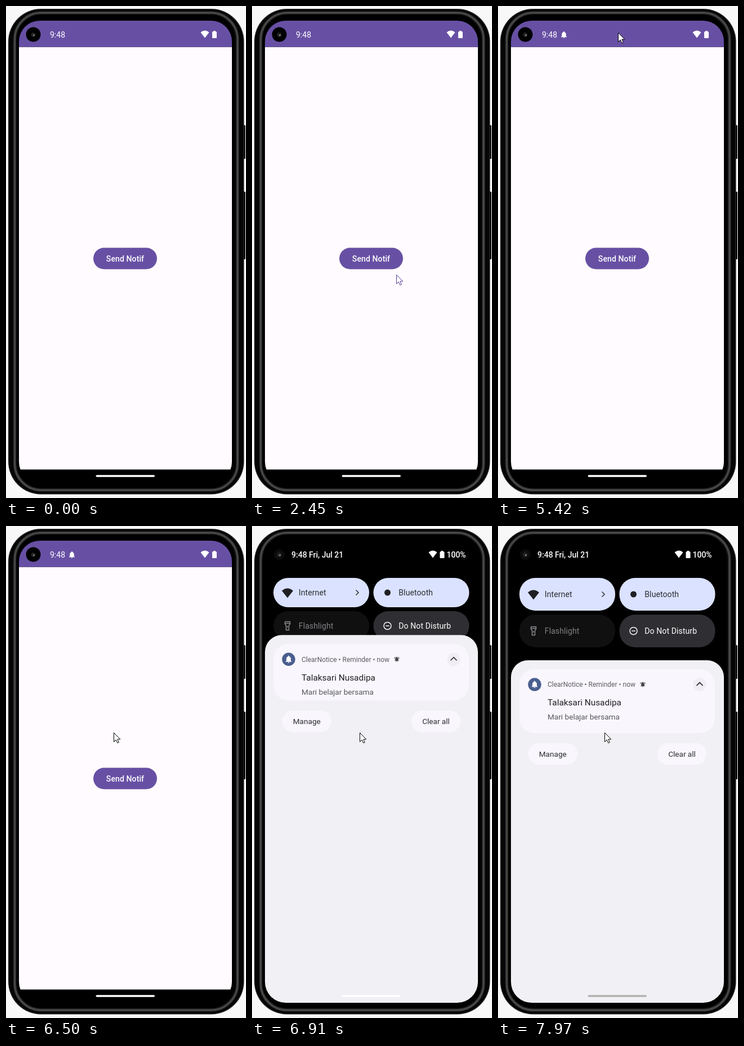
An HTML page with a canvas for the animation above (8 s loop, 426 by 872 pixels).

```html
<!DOCTYPE html>
<html lang="en">
<head>
<meta charset="utf-8">
<title>Notification demo</title>
<style>
html, body { margin: 0; width: 100%; height: 100%; overflow: hidden; background: #f8f8f8; }
canvas { display: block; width: 426px; height: 872px; }
</style>
</head>
<body>
<canvas id="stage"></canvas>
<script>
const W = 426, H = 872, LOOP = 8000;
const canvas = document.getElementById('stage');
const ctx = canvas.getContext('2d');
const dpr = window.devicePixelRatio || 1;
canvas.width = W * dpr;
canvas.height = H * dpr;

const PURPLE = '#6750a4', PAGE = '#fffbfe', PANEL = '#f1f0f4', CARD = '#f9f7fd',
      SKY = '#dae2ff', NAVY = '#4a5f8f', INK = '#1f1f23';

const bellBody = new Path2D('M18 16v-5c0-3.07-1.64-5.64-4.5-6.32V4c0-.83-.67-1.5-1.5-1.5s-1.5.67-1.5 1.5v.68C7.63 5.36 6 7.92 6 11v5l-2 2v1h16v-1z');
const bellClapper = new Path2D('M10 20h4a2 2 0 0 1-4 0z');
const bellWaves = new Path2D('M7.6 4.1L6.15 2.65A10.4 10.4 0 0 0 2 10.5h2a8.4 8.4 0 0 1 3.6-6.4zM20 10.5h2a10.4 10.4 0 0 0-4.15-7.85L16.4 4.1a8.4 8.4 0 0 1 3.6 6.4z');
const arrow = new Path2D('M.5 .5V16.5L4.2 13L6.8 18.6L9.3 17.5L6.8 12H11.8Z');

// Each move: start, end, number of steps, points on the way
const moves = [
  [380, 970, 10, [402, 816], [376, 578], [258, 478]],
  [1040, 1110, 2, [258, 478], [256, 476]],
  [2640, 3160, 8, [256, 476], [219, 460]],
  [5210, 5420, 4, [219, 460], [213, 47]],
  [5750, 5890, 3, [213, 47], [199, 50]],
  [6220, 6500, 5, [199, 50], [197, 35], [192, 100], [186, 190], [181, 320], [191, 366]],
  [7970, 7970, 1, [191, 366], [189, 366]]
];

const mix = (a, b, p) => a + (b - a) * p;

function stepped(t, from, to, n) {
  if (t < from) return 0;
  if (t >= to) return 1;
  return (Math.floor((t - from) / (to - from) * (n - 1)) + 1) / n;
}

function along(points, p) {
  const at = p * (points.length - 1);
  const i = Math.min(Math.floor(at), points.length - 2);
  const [a, b] = [points[i], points[i + 1]];
  return [mix(a[0], b[0], at - i), mix(a[1], b[1], at - i)];
}

function box(x, y, w, h, r, fill) {
  ctx.beginPath();
  ctx.roundRect(x, y, w, h, r);
  ctx.fillStyle = fill;
  ctx.fill();
}

function disc(x, y, r, fill) {
  ctx.beginPath();
  ctx.arc(x, y, r, 0, 7);
  ctx.fillStyle = fill;
  ctx.fill();
}

function line(color, width, ...points) {
  ctx.beginPath();
  points.forEach(([x, y]) => ctx.lineTo(x, y));
  ctx.strokeStyle = color;
  ctx.lineWidth = width;
  ctx.stroke();
}

function text(str, x, y, size, color, weight = 400, align = 'left', spacing = 0) {
  ctx.font = `${weight} ${size}px Roboto, sans-serif`;
  ctx.textAlign = align;
  ctx.letterSpacing = spacing + 'px';
  ctx.fillStyle = color;
  ctx.fillText(str, x, y);
  return ctx.measureText(str).width;
}

function faded(alpha, draw) {
  if (alpha <= 0) return;
  ctx.save();
  ctx.globalAlpha = alpha;
  draw();
  ctx.restore();
}

function bell(cx, cy, scale, color, waves = false, clapper = true) {
  ctx.save();
  ctx.translate(cx - 12 * scale, cy - 12.25 * scale);
  ctx.scale(scale, scale);
  ctx.fillStyle = color;
  ctx.fill(bellBody);
  if (clapper) ctx.fill(bellClapper);
  if (waves) ctx.fill(bellWaves);
  ctx.restore();
}

function wifi(cx, cy, r, color) {
  ctx.beginPath();
  ctx.moveTo(cx, cy + r * 0.86);
  ctx.lineTo(cx - r, cy - r * 0.42);
  ctx.quadraticCurveTo(cx, cy - r * 1.3, cx + r, cy - r * 0.42);
  ctx.closePath();
  ctx.fillStyle = color;
  ctx.fill();
}

function battery(x) {
  box(x, 45.5, 8, 11.5, 1, '#fff');
  box(x + 2, 44, 4, 3, 0.5, '#fff');
}

function phone() {
  ctx.fillStyle = '#f8f8f8';
  ctx.fillRect(0, 0, W, H);
  box(420, 211, 5, 60, 1.5, '#151515');
  box(420, 329, 5, 120, 1.5, '#0a0a0a');
  box(4, 5, 418.5, 860.5, 58, '#1d1d1d');
  box(5.5, 6.5, 415.5, 857.5, 57, '#050505');
  // Soft metal highlight, widest layer first
  for (const [width, color] of [[6, '#1a1b1a'], [4, '#363735'], [2, '#4b4c4a']]) {
    ctx.beginPath();
    ctx.roundRect(15.5, 12, 395.5, 846, 47);
    ctx.strokeStyle = color;
    ctx.lineWidth = width;
    ctx.stroke();
  }
}

function camera(inShade) {
  disc(48.5, 50.5, inShade ? 9.5 : 13, inShade ? '#0c0c0c' : '#000');
  disc(48.5, 51, 3.6, '#333');
  disc(48.5, 51, 2, '#0c0c0c');
  disc(49.3, 51.6, 1.2, '#b5b5b5');
}

function statusBar() {
  text('9:48', 78, 56.4, 14, '#fff');
  wifi(353, 50, 7.5, '#fff');
  battery(366);
}

function homePage(t) {
  ctx.fillStyle = PAGE;
  ctx.fillRect(23, 72.7, 378, 748.8);
  ctx.fillStyle = PURPLE;
  ctx.fillRect(23, 26, 378, 46.7);
  statusBar();
  const rise = stepped(t, 4140, 4340, 4);
  faded(rise, () => bell(117, 51, 0.62, '#fff', false, t >= 4530));

  box(155, 428.5, 113, 38, 19, PURPLE);
  if (t >= 4140 && t < 4340) {
    ctx.save();
    ctx.beginPath();
    ctx.roundRect(155, 428.5, 113, 38, 19);
    ctx.clip();
    disc(219, 460, 70 * rise, 'rgba(255,255,255,.14)');
    ctx.restore();
  }
  text('Send Notif', 211.5, 452.5, 14, '#fff', 500, 'center', 0.1);
}

function dialog() {
  box(47.5, 313, 328.5, 268.5, 27, PANEL);
  bell(211.5, 346, 1.34, NAVY, true);
  const size = 19.3;
  const parts = [['Allow ', 400], ['ClearNotice', 700], [' to send you', 400]];
  let total = 0;
  for (const [str, weight] of parts) {
    ctx.font = `${weight} ${size}px Roboto, sans-serif`;
    ctx.letterSpacing = '0px';
    total += ctx.measureText(str).width;
  }
  let x = 211.5 - total / 2;
  for (const [str, weight] of parts) x += text(str, x, 393.5, size, INK, weight);
  text('notifications?', 211.5, 416, size, INK, 400, 'center');
  box(70.5, 446.5, 282.5, 54, [14, 14, 4, 4], SKY);
  box(70.5, 504.5, 282.5, 54, [4, 4, 14, 14], SKY);
  text('Allow', 211.5, 478.5, 13.5, '#2b2c30', 400, 'center');
  text("Don't allow", 211.5, 536.5, 13.5, '#2b2c30', 400, 'center');
}

function toast(alpha, inkAlpha) {
  faded(alpha, () => {
    ctx.shadowColor = 'rgba(0,0,0,.14)';
    ctx.shadowBlur = 4 * dpr;
    box(80, 733, 263, 45, 22.5, '#efedf2');
  });
  faded(alpha * inkAlpha, () => {
    disc(107, 753.5, 10.5, '#3ddc84');
    text('Notifications permission granted', 126, 758.5, 13.3, INK);
  });
}

function tile(x, y, h, fill, label, color) {
  box(x, y, 170, h, Math.min(28, h / 2), fill);
  text(label, x + 44.8, y + h / 2 + 5, 14, color, 400, 'left', 0.1);
}

function quickSettings(p) {
  const h = mix(52, 58, p), row2 = 92 + h + 7;
  const c1 = 92 + h / 2, c2 = row2 + h / 2;
  tile(38, 92, h, SKY, 'Internet', '#2b2c30');
  wifi(63, c1 + 1, 10, INK);
  line('#3a3b40', 1.6, [184.5, c1 - 4.5], [189, c1], [184.5, c1 + 4.5]);
  tile(215.5, 92, h, SKY, 'Bluetooth', '#2b2c30');
  disc(240.5, c1, 5.5, INK);
  tile(38, row2, h, '#101011', 'Flashlight', '#828286');
  line('#8a8a8e', 1.5, [58.5, c2 - 7.5], [67.5, c2 - 7.5], [67.5, c2 - 3.5], [65.5, c2 - 0.5],
    [65.5, c2 + 7.5], [60.5, c2 + 7.5], [60.5, c2 - 0.5], [58.5, c2 - 3.5], [58.5, c2 - 7.5]);
  line('#8a8a8e', 1.3, [58.5, c2 - 4.5], [67.5, c2 - 4.5]);
  disc(63, c2 + 1.5, 1.2, '#8a8a8e');
  tile(215.5, row2, h, '#2f2f33', 'Do Not Disturb', '#fff');
  ctx.beginPath();
  ctx.arc(240.5, c2, 6.5, 0, 7);
  ctx.strokeStyle = '#f2f1f5';
  ctx.lineWidth = 1.5;
  ctx.stroke();
  line('#f2f1f5', 1.5, [237.2, c2], [243.8, c2]);
}

function notification(top, h) {
  box(38, top, 347, h, 27, CARD);
  const cy = top + 27.5;
  disc(65, cy, 11.7, NAVY);
  bell(65, cy, 0.66, '#fff');
  text('ClearNotice', 88, cy + 4.5, 12, '#5b5b60');
  text('• Reminder • now', 153.5, cy + 4.5, 12, '#5b5b60');
  bell(257, cy, 0.47, '#46464b', true);
  disc(358, cy, 11.7, '#f0eef4');
  line(INK, 1.5, [352.5, cy + 2], [358, cy - 3.5], [363.5, cy + 2]);
  text('Talaksari Nusadipa', 88, top + 65, 15.4, INK);
  text('Mari belajar bersama', 88, top + 89.8, 13.6, '#56565b');
}

function pillButton(x, y, w, label) {
  box(x, y, w, 38.5, 19, CARD);
  text(label, x + w / 2, y + 24, 13.6, '#2b2c30', 400, 'center');
}

function shade(t) {
  const settle = stepped(t, 7380, 7780, 6);
  const p = 1.06 * stepped(t, 7120, 7240, 3) - 0.06 * settle;
  text('9:48 Fri, Jul 21', 70, 56.4, 14, '#fff', 500);
  wifi(321, 50, 7.5, '#fff');
  battery(333.5);
  text('100%', 345.5, 56.4, 14, '#fff', 500);
  quickSettings(p);

  const top = mix(193.3, 238, p);
  box(23, top, 378, 660, [30, 30, 0, 0], PANEL);
  const cardTop = top + 15.4, cardH = mix(100.5, 113.7, p);
  notification(cardTop, cardH);
  const y = cardTop + cardH + 17.7;
  pillButton(53.5, y, 87.5, 'Manage');
  pillButton(283, y, 87, 'Clear all');
  return Math.round(mix(255, 178, settle));
}

function cursor(t) {
  if (t < moves[0][0]) return;
  const [from, to, n, ...points] = moves.findLast(m => t >= m[0]);
  const [x, y] = along(points, stepped(t, from, to, n));
  ctx.save();
  ctx.translate(Math.round(x), Math.round(y));
  ctx.fillStyle = '#fff';
  ctx.fill(arrow);
  ctx.strokeStyle = t >= 1710 && t < 2580 ? '#4b3a9a' : '#000';
  ctx.lineWidth = 1;
  ctx.stroke(arrow);
  ctx.restore();
}

function draw(t) {
  ctx.setTransform(dpr, 0, 0, dpr, 0, 0);
  phone();
  box(18.5, 16, 387, 838, 44, '#000');
  ctx.save();
  ctx.beginPath();
  ctx.roundRect(23, 26, 378, 819, 37);
  ctx.clip();
  let nav = 255;
  if (t < 6700) {
    homePage(t);
    if (t < 1710) faded(stepped(t, 180, 310, 3), dialog);
    if (t < 4080) toast(stepped(t, 2580, 2780, 3), 1 - 0.85 * stepped(t, 3690, 3760, 2));
  } else if (t < 6910) {
    statusBar();
  } else {
    nav = shade(t);
  }
  box(159.5, 831.2, 104.5, 3.6, 1.8, `rgb(${nav},${nav},${nav})`);
  camera(t >= 6700);
  ctx.restore();
  cursor(t);
}

function tick() {
  draw(performance.now() % LOOP);
  requestAnimationFrame(tick);
}
tick();
</script>
</body>
</html>
```
